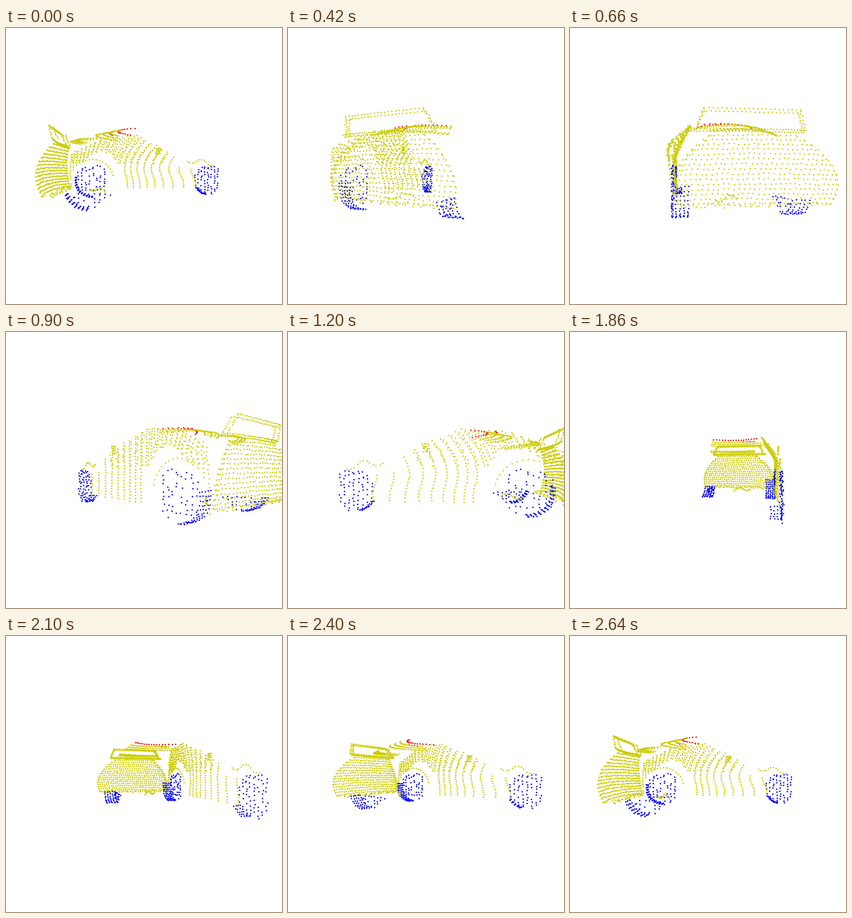
A matplotlib script for the animation above (2700 ms loop, 512 by 512 pixels).

```python
import numpy as np
import matplotlib.pyplot as plt
from matplotlib.animation import FuncAnimation

SIZE, DPI = 512, 100
FRAMES, INTERVAL = 45, 60
CAM = 455        # camera distance; one unit is one pixel at the pivot
SHIFT = 32       # pivot offset to the right
START = 8.6      # heading of the car at the first frame, degrees
AXLE, RADIUS = -31, 34
REAR, FRONT = -130, 130
YELLOW, BLUE, RED = (0.8, 0.8, 0), (0, 0, 1), (1, 0, 0)

rng = np.random.default_rng(4)
points, colors = [], []


def add(u, w, y, color=YELLOW, noise=0.4):
    """Add points: u forward, w sideways, y up."""
    p = np.column_stack([a.ravel() for a in np.broadcast_arrays(u, w, y)])
    points.append(p + rng.uniform(-noise, noise, p.shape))
    colors.append(np.tile(color, (len(p), 1)))


def tail_u(w, y):
    s = w / 90
    return -197 + 7 * s + 8 * s ** 2 + 16 * ((y + 12) / 45) ** 2


def tail():
    for y in np.arange(35, -44, -5.4):
        half = 90 - 0.0122 * (y + 22) ** 2
        w = np.r_[-half, np.arange(-half, half, 5.5) + rng.uniform(0, 3),
                  half - 2, half + 1]
        yy = y - 2 * (w / 90) ** 2
        add(tail_u(w, yy), w, yy, noise=0.8)
    # ragged bumper edge
    w = np.linspace(-82, 82, 40)
    add(rng.uniform(-188, -172, 40), w, rng.uniform(-46, -42, 40))


def side_w(u, y):
    bulge = 8 * np.exp(-((u + 150) / 45) ** 2 - ((y - 22) / 16) ** 2)
    upper = 0.0055 * np.maximum(y + 10, 0) ** 2
    lower = 4.5 * np.sin(np.minimum(y + 6, 0) * np.pi / 70) ** 2
    return 95 + bulge - upper - lower


def roofline(u):
    """Height of the side's upper edge: boot curve, flat roof, windscreen."""
    boot = 64 - 0.0023 * np.minimum(u + 45, 0) ** 2
    screen = 64 - 0.5 * np.maximum(u + 32, 0)
    return np.where(u < 64, np.minimum(boot, screen), -5)


def scan(angles, y, noise):
    """Columns of points seen from one spot beside and behind the car."""
    for a in np.radians(angles):
        u = -250 + np.tan(a) * (245 - side_w(-400, y))
        arch = 45 + 22 * np.clip((u + 150) / 40, 0, 1)
        ok = (y < roofline(u)) & (np.hypot(u - REAR, y - AXLE) > arch)
        ok &= (y > 4) | (u > -63) | (u < -150)
        yy = y + rng.uniform(-1.5, 1.5)
        add(u[ok], side_w(u, yy)[ok], yy[ok], noise=noise)


def side():
    scan(np.linspace(26, 66.2, 23), np.arange(-47, 66, 4.8), 0.6)
    scan(np.linspace(27, 61, 18), np.arange(8, 64, 5.5), 1.5)
    t = np.radians(np.linspace(14, 118, 12))
    add(REAR + 45 * np.cos(t), 93, AXLE + 45 * np.sin(t))
    # front arch and mirror
    u = np.linspace(82, 142, 12)
    add(u, 92, 11 - 0.004 * (u - 100) ** 2 + 4 * np.sin(u), noise=1)
    u, y = np.meshgrid(np.linspace(10, 19, 4), np.linspace(28, 39, 4))
    add(u + (y - 34) * 0.2, 94, y, noise=1)


def arc(u0, y, lo, hi, n, k, color=YELLOW):
    w = np.linspace(lo, hi, n)
    add(u0 + k * (w - 10) ** 2, w, y - 0.0004 * (w - 10) ** 2, color, 0.4)


def roof():
    for i in range(3):
        arc(-119 + 13 * i, 55 + 3 * i, -45 + 3 * i, 74 - 12 * i,
            34 - 5 * i, 0.010)
        arc(-163 + 5 * i, 43 + 1.5 * i, -52, 46, 25, 0.011)
    arc(-95, 62, 24, 48, 4, 0.004, RED)
    arc(-80, 64, -34, 55, 17, 0.014, RED)


def wing():
    w = np.linspace(-50, 58, 23)
    add(-188, w, 62.5)
    add(-185, w + 2, 59.5)
    w = np.linspace(-60, 72, 38)
    edge = -185 + 6 * (w / 70) ** 2
    add(edge, w, 41)
    add(edge + 3, w, 38.5)
    t = np.linspace(0, 1, 8)
    for w0, w1 in ((-50, -60), (58, 66)):
        for du in (0, 7):
            add(-188 + 8 * t + du, w0 + (w1 - w0) * t, 61 - 20 * t, noise=1)


def tread(u0, lo, hi, n, w):
    t, w = np.meshgrid(np.radians(np.linspace(lo, hi, n)), w)
    add(u0 + RADIUS * np.cos(t), w, AXLE + RADIUS * np.sin(t), BLUE, 0.8)


def face(u0, w, lo, hi, top, keep):
    u, y = np.meshgrid(np.arange(lo, hi, 7.8), np.arange(-64, top, 6.2))
    y = y + rng.uniform(-2.5, 2.5, u.shape)
    ok = np.hypot(u - u0, y - AXLE) < RADIUS + 1
    ok &= rng.random(u.shape) < keep
    add(u[ok], w, y[ok], BLUE, 1.3)


def wheels():
    face(FRONT, 93, 100, 160, 4, 0.85)
    tread(FRONT, 214, 254, 5, np.linspace(80, 93, 4))
    face(REAR, 93, -160, -98, 5, 0.6)
    tread(REAR, 168, 268, 12, np.linspace(74, 93, 5))
    # far rear wheel, seen only beneath the floor
    tread(REAR + 3, 200, 266, 8, np.linspace(-78, -54, 5))
    face(REAR + 3, -56, -150, -92, -40, 0.9)


def underbody():
    t = np.linspace(0, 1, 16)
    add(-132 + 28 * t, 38 - 34 * t, -44 - 4 * np.sin(t * 7), noise=1.2)


for part in (tail, side, roof, wing, wheels, underbody):
    part()
points = np.vstack(points)
colors = np.vstack(colors)

fig = plt.figure(figsize=(SIZE / DPI, SIZE / DPI), dpi=DPI, facecolor="white")
ax = fig.add_axes([0, 0, 1, 1])
ax.set(xlim=(0, SIZE), ylim=(SIZE, 0))
ax.axis("off")
dots = ax.scatter(points[:, 0], points[:, 1], s=(2.7 * 72 / DPI) ** 2,
                  c=colors, linewidths=0)


def draw(i):
    a = np.radians(START + 360 * i / FRAMES)
    u, w, y = points.T
    x = u * np.cos(a) - w * np.sin(a) + SHIFT
    depth = 1 + (u * np.sin(a) + w * np.cos(a)) / CAM
    order = np.argsort(-depth)
    screen = np.column_stack([SIZE / 2 + x / depth, SIZE / 2 - y / depth])
    dots.set_offsets(screen[order])
    dots.set_facecolors(colors[order])
    return (dots,)


anim = FuncAnimation(fig, draw, frames=FRAMES, interval=INTERVAL,
                     repeat=True, repeat_delay=0)
plt.show()
```
